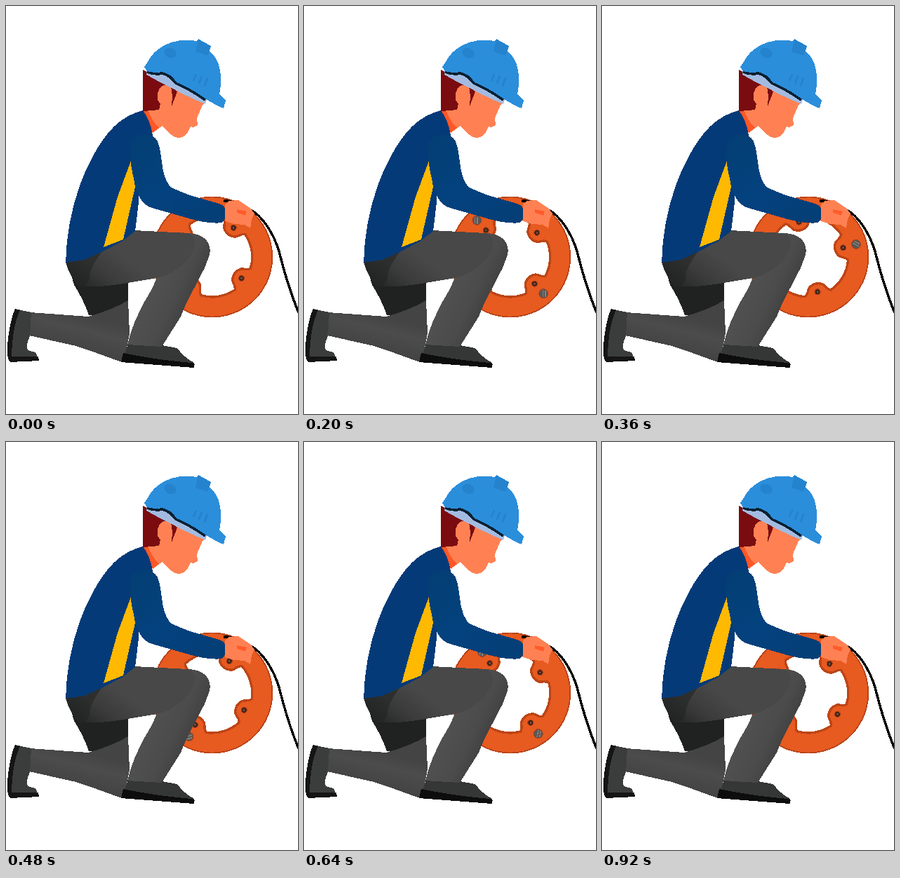
Write an HTML page that moves like this. It is 416x582 px and loops after 0.96 s.

```html
<!DOCTYPE html>
<html lang="en">
<head>
<meta charset="utf-8">
<title>Worker with cable reel</title>
<style>
html, body { margin: 0; width: 100%; height: 100%; overflow: hidden; background: #fff; }
svg { display: block; width: 416px; height: 582px; }
</style>
</head>
<body>
<svg viewBox="0 0 416 582" shape-rendering="crispEdges">
  <defs>
    <radialGradient id="shirt" gradientUnits="userSpaceOnUse" r="1" gradientTransform="translate(124 292) rotate(22) scale(62 150)">
      <stop offset="0" stop-color="#034c9c"/><stop offset=".5" stop-color="#034a97"/><stop offset="1" stop-color="#053a78"/>
    </radialGradient>
    <linearGradient id="sleeve" gradientUnits="userSpaceOnUse" x1="190" y1="190" x2="270" y2="300">
      <stop offset="0" stop-color="#033f74"/><stop offset=".6" stop-color="#04427f"/><stop offset="1" stop-color="#043f78"/>
    </linearGradient>
    <linearGradient id="thigh" gradientUnits="userSpaceOnUse" x1="110" y1="398" x2="150" y2="345">
      <stop offset="0" stop-color="#272928"/><stop offset=".45" stop-color="#3b3b3b"/><stop offset="1" stop-color="#484848"/>
    </linearGradient>
    <linearGradient id="shin" gradientUnits="userSpaceOnUse" x1="210" y1="400" x2="262" y2="425">
      <stop offset="0" stop-color="#505050"/><stop offset=".6" stop-color="#4b4b4b"/><stop offset="1" stop-color="#414141"/>
    </linearGradient>
    <linearGradient id="calf" gradientUnits="userSpaceOnUse" x1="110" y1="442" x2="98" y2="490">
      <stop offset="0" stop-color="#444"/><stop offset=".4" stop-color="#4c4c4c"/><stop offset="1" stop-color="#434343"/>
    </linearGradient>
    <g id="bolt">
      <circle r="4.6" fill="#a83f18"/><circle r="3.4" fill="#40251b"/><circle r="1.4" fill="#8b4a30"/>
    </g>
    <g id="screw">
      <circle r="7" fill="#a9421b"/><circle r="6" fill="#5b5653"/>
      <path d="M-4-3L3 4M-1-5L5 1" stroke="#85817d" stroke-width="1.5"/>
    </g>
  </defs>

  <g id="reel">
    <path id="ring" fill="#e75a20" fill-rule="evenodd"/>
    <path id="bevel" fill="none" stroke="#bd4516" stroke-width="3.4"/>
    <circle id="edge" fill="none" stroke="#b8441a" stroke-width="1.8"/>
    <g id="parts"></g>
  </g>

  <g fill="none" stroke="#000" stroke-width="3.4">
    <path d="M310 278Q318 277 325 281"/>
    <path d="M347 290C367 300 382 327 389 350C396 378 406 412 418 440"/>
  </g>

  <!-- legs -->
  <path fill="#202221" d="M92 380L116 396L174 394L174 430L150 444L118 441Q110 418 97 398Z"/>
  <path fill="url(#calf)" d="M34 437L117 443Q150 434 174 420L176 467L168 508L162 507Q130 495 100 485L33 470Z"/>
  <path fill="#3b3d3c" d="M13 432L36 437L34 471Q28 483 31 491L42 494L47 505L6 507Q2 501 3 483Q5 450 13 432Z"/>
  <path fill="#151515" d="M13 432L20 434Q9 457 8 500L46 500L47 506L6 508Q1 503 2 484Q5 450 13 432Z"/>
  <path fill="#353736" d="M174 482L222 484L244 488Q252 500 268 509L268 516L165 508Z"/>
  <path fill="#0d0d0d" d="M167 495Q215 505 265 509L269 511L267 516L164 508Z"/>
  <path fill="url(#shin)" d="M185 321L262 324C285 326 295 341 289 358C282 382 261 410 249 443L222 486L173 483L178 465Q187 438 207 405L215 388Z"/>
  <path fill="url(#thigh)" d="M85 363L112 358L140 345L183 320L258 324C278 328 270 357 245 374Q231 385 215 388L173 395Q135 402 104 400Q91 386 85 366Z"/>
  <path fill="#222423" opacity=".55" d="M85 363L112 359L137 350Q118 375 119 390L112 400L104 400Q90 384 85 366Z"/>

  <!-- head -->
  <path fill="#7a0c10" d="M195 91L240 112L245 124L238 143L217 150L195 150Z"/>
  <path fill="#ff8153" d="M237 117L285 137L280 141L272 160L273 170L267 173L263 172L259 180Q254 188 245 188Q236 187 223 171L210 180L197 150L218 148L220 139Q214 135 216 124Q220 111 232 112L240 120Z"/>
  <path fill="#7a0c10" d="M235 114L244 122L236 143L237 128Z"/>
  <path fill="#ff5727" d="M195 150L203 150Q208 164 218 174L209 181Z"/>

  <!-- torso -->
  <path fill="url(#shirt)" d="M195 149Q206 164 209 184L190 255L189 280L186 305L184 321L165 336L140 349L112 362L85 366C86 315 99 258 125 212C142 181 162 157 195 149Z"/>
  <path fill="#ffb900" d="M178 221L184 258L167 333L139 344L159 272Z"/>
  <path fill="url(#sleeve)" d="M177 196C178 183 207 176 216 193C224 212 219 239 234 258Q246 264 262 270L304 282C316 285 316 302 308 309Q288 312 250 300L208 288C191 283 187 267 183 250Q175 220 177 196Z"/>

  <!-- hand -->
  <path fill="#ff8153" d="M312 283L318 278L331 277L349 289L354 296L350 304L348 317L340 312L325 311L312 307Z"/>
  <path fill="#ff5b2b" d="M329 290L343 293L341 299L329 295Z"/>

  <!-- helmet -->
  <path fill="#a3bbe0" d="M200 92L222 92L242 106L287 130L284 140Q258 129 238 118L220 109L200 98Z"/>
  <path fill="none" stroke="#0b2133" stroke-width="4" d="M201 94Q211 98 223 96Q234 99 242 110Q261 118 284 134"/>
  <path fill="#2b8edb" d="M197 87L203 78C212 59 240 44 271 50L274 47L292 57L290 64C306 78 309 100 304 126L313 135L310 146Q299 142 284 132Q263 117 243 109Q236 97 222 94Q211 96 201 93Z"/>
  <g fill="#2583ce">
    <path d="M274 47L292 57L287 71L270 65Z"/>
    <ellipse cx="234" cy="67" rx="9" ry="7" transform="rotate(25 234 67)"/>
  </g>
  <path fill="none" stroke="#2583ce" stroke-width="3" stroke-linecap="round" d="M271 98L267 106M279 100L275 110M287 103L283 114"/>
</svg>
<script>
const STEP = 40, LOOP = 960, TURN = 23;
const CX = 293.8, CY = 358, OUTER = 86.4, INNER = 57;
const START = 126;
const get = id => document.getElementById(id);

// Inner edge of the ring: four identical lugs joined by arcs.
const lug = [[53.7, -19], [51, -13], [47, -14], [43, -10], [38.5, -4], [38.5, 4],
  [43, 10], [47, 14], [51, 13], [53.7, 19]];

function turned([x, y], quarter) {
  const a = quarter * Math.PI / 2, c = Math.cos(a), s = Math.sin(a);
  return (x * c - y * s).toFixed(2) + ' ' + (x * s + y * c).toFixed(2);
}

function innerPath() {
  let d = '';
  for (let q = 0; q < 4; q++) {
    const p = lug.map(v => turned(v, q));
    d += q ? `A${INNER} ${INNER} 0 0 1 ${p[0]}` : `M${p[0]}`;
    d += 'C' + p.slice(1).join(' ');
  }
  return d + `A${INNER} ${INNER} 0 0 1 ${turned(lug[0], 0)}Z`;
}

const inner = innerPath();
const half = x => `A${OUTER} ${OUTER} 0 1 1 ${x} 0`;
get('ring').setAttribute('d', `M${OUTER} 0${half(-OUTER)}${half(OUTER)}Z${inner}`);
get('bevel').setAttribute('d', inner);
get('edge').setAttribute('r', OUTER - 0.9);
get('parts').innerHTML = [0, 1, 2, 3].map(q =>
  `<g transform="rotate(${q * 90})"><use href="#bolt" x="51.5"/>` +
  (q % 2 ? '' : '<use href="#screw" x="70.5"/>') + '</g>').join('');

function draw(ms) {
  const step = Math.floor((ms % LOOP) / STEP);
  const angle = START - 360 * step / TURN;
  get('reel').setAttribute('transform', `translate(${CX} ${CY}) rotate(${angle})`);
}

let origin;
function tick(now) {
  origin ??= now;
  draw(now - origin);
  requestAnimationFrame(tick);
}
draw(0);
requestAnimationFrame(tick);
</script>
</body>
</html>
```
